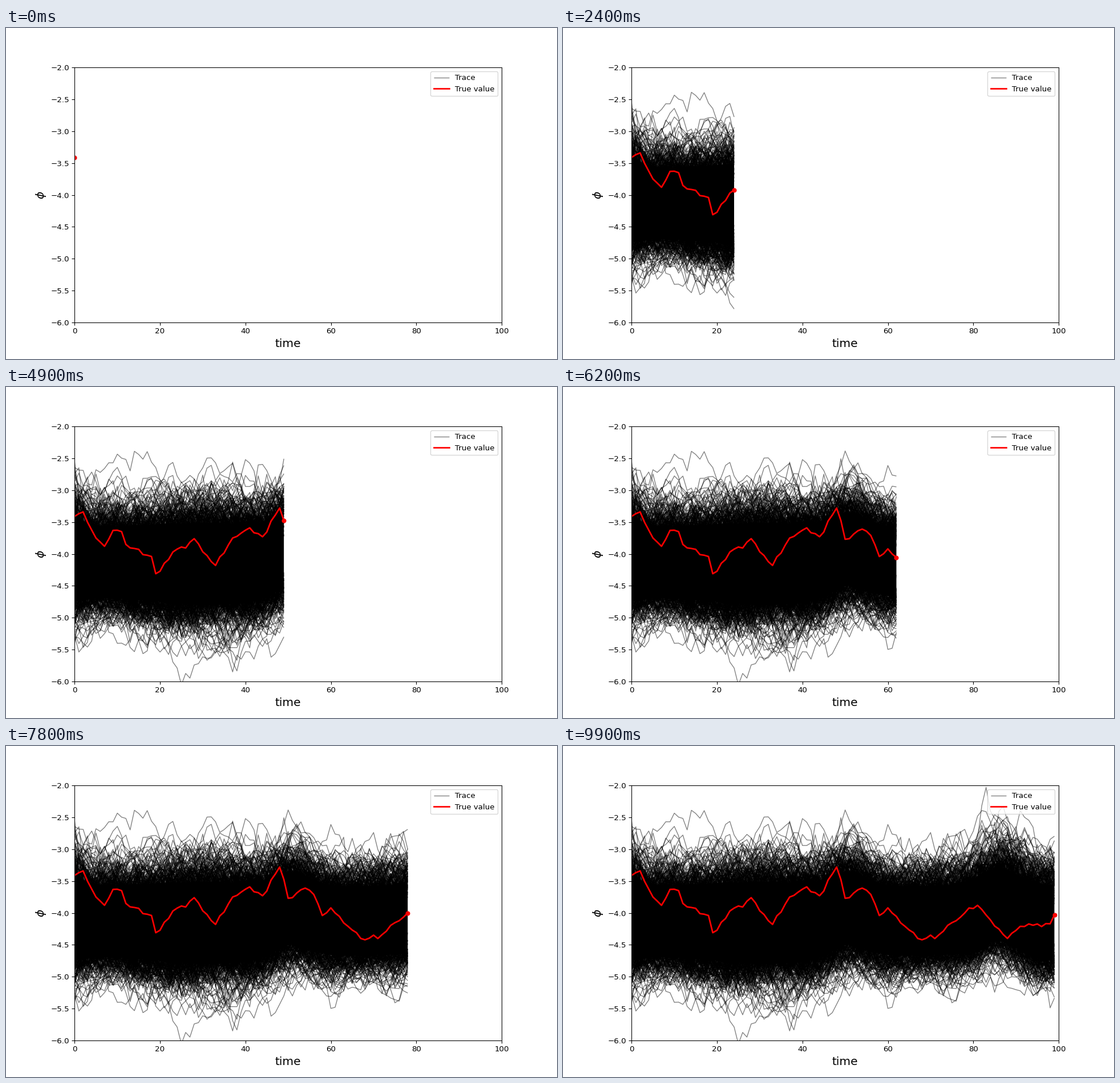
Write a matplotlib script that moves like this. It is 966 px wide and 580 px high and loops after 10 s.

```python
import numpy as np
import matplotlib.pyplot as plt
from matplotlib.animation import FuncAnimation
from matplotlib.collections import LineCollection
from matplotlib.patches import Polygon

W, H, DPI = 966, 580, 96.6
STEPS = 100
N_TRACES = 1000
AR = 0.94
CORE = 1.4  # inside this many deviations the traces merge into solid black

# Turning points of the true path; small seeded noise fills the gaps
TURNS = [(0, -3.41), (2, -3.34), (5, -3.75), (7, -3.88), (9, -3.63),
         (11, -3.65), (12, -3.85), (18, -4.04), (19, -4.31), (23, -3.97),
         (28, -3.76), (33, -4.18), (37, -3.75), (41, -3.59), (44, -3.73),
         (48, -3.28), (50, -3.77), (54, -3.61), (56, -3.71), (58, -4.04),
         (60, -3.92), (67, -4.40), (72, -4.34), (78, -4.00), (81, -3.88),
         (88, -4.40), (91, -4.21), (98, -4.17), (99, -4.03)]

rng = np.random.default_rng(7)
t = np.arange(STEPS)


def bump(mid, width):
    return np.exp(-((t - mid) / width)**2 / 2)


def make_true_path():
    x, y = np.array(TURNS).T
    path = np.interp(t, x, y) + rng.normal(0, 0.025, STEPS)
    path[x.astype(int)] = y
    return path


# Middle of the bundle and its spread to either side over time
center = -4.17 + 0.22 * (bump(51, 4) + bump(86, 4))
above = (0.42 + 0.05 * bump(30, 12) + 0.05 * bump(86, 8)
         + 0.16 * np.exp(-t / 2.5))
below = (0.35 + 0.10 * bump(32, 13) + 0.06 * bump(100, 5)
         + 0.06 * np.exp(-t / 3))


def level(z):
    return center + z * np.where(z > 0, above, below)


def make_traces():
    """Autoregressive paths, keeping only the parts that leave the core."""
    z = rng.standard_normal((N_TRACES, STEPS))
    for i in range(1, STEPS):
        z[:, i] = AR * z[:, i - 1] + np.sqrt(1 - AR**2) * z[:, i]
    outside = np.abs(z) > CORE
    keep = outside.copy()
    keep[:, 1:] |= outside[:, :-1]
    keep[:, :-1] |= outside[:, 1:]
    y = np.where(keep, level(z), np.nan)
    return np.dstack([np.broadcast_to(t, y.shape), y])


true_path = make_true_path()
traces = make_traces()
core_top = level(np.full(STEPS, CORE))
core_bottom = level(np.full(STEPS, -CORE))

fig, ax = plt.subplots(figsize=((W + 0.001) / DPI, (H + 0.001) / DPI), dpi=DPI)
fig.subplots_adjust(left=120.3 / W, right=869 / W,
                    top=1 - 69.2 / H, bottom=1 - 515.9 / H)
ax.set(xlim=(0, 100), ylim=(-6, -2))
ax.set_xlabel("time", fontsize=15)
ax.set_ylabel(r"$\phi$", fontsize=15)

core = Polygon([(0, -4), (0, -4)], facecolor="black", linewidth=0, zorder=1)
ax.add_patch(core)
lines = LineCollection([], colors="black", linewidths=1, alpha=0.5,
                       zorder=1.5, label="Trace")
ax.add_collection(lines, autolim=False)
true_line, = ax.plot([], [], color="red", lw=2, label="True value")
dot, = ax.plot([], [], "ro", ms=5)
ax.legend(handles=[lines, true_line], loc="upper right")


def update(k):
    n = k + 1
    lines.set_segments(traces[:, :n] if k else [])
    core.set_visible(k > 0)
    core.set_xy(np.column_stack([
        np.r_[t[:n], t[:n][::-1]],
        np.r_[core_top[:n], core_bottom[:n][::-1]]]))
    true_line.set_data(t[:n], true_path[:n])
    dot.set_data([k], [true_path[k]])
    return core, lines, true_line, dot


anim = FuncAnimation(fig, update, frames=STEPS, interval=100, repeat=True,
                     repeat_delay=0)
plt.show()
```
